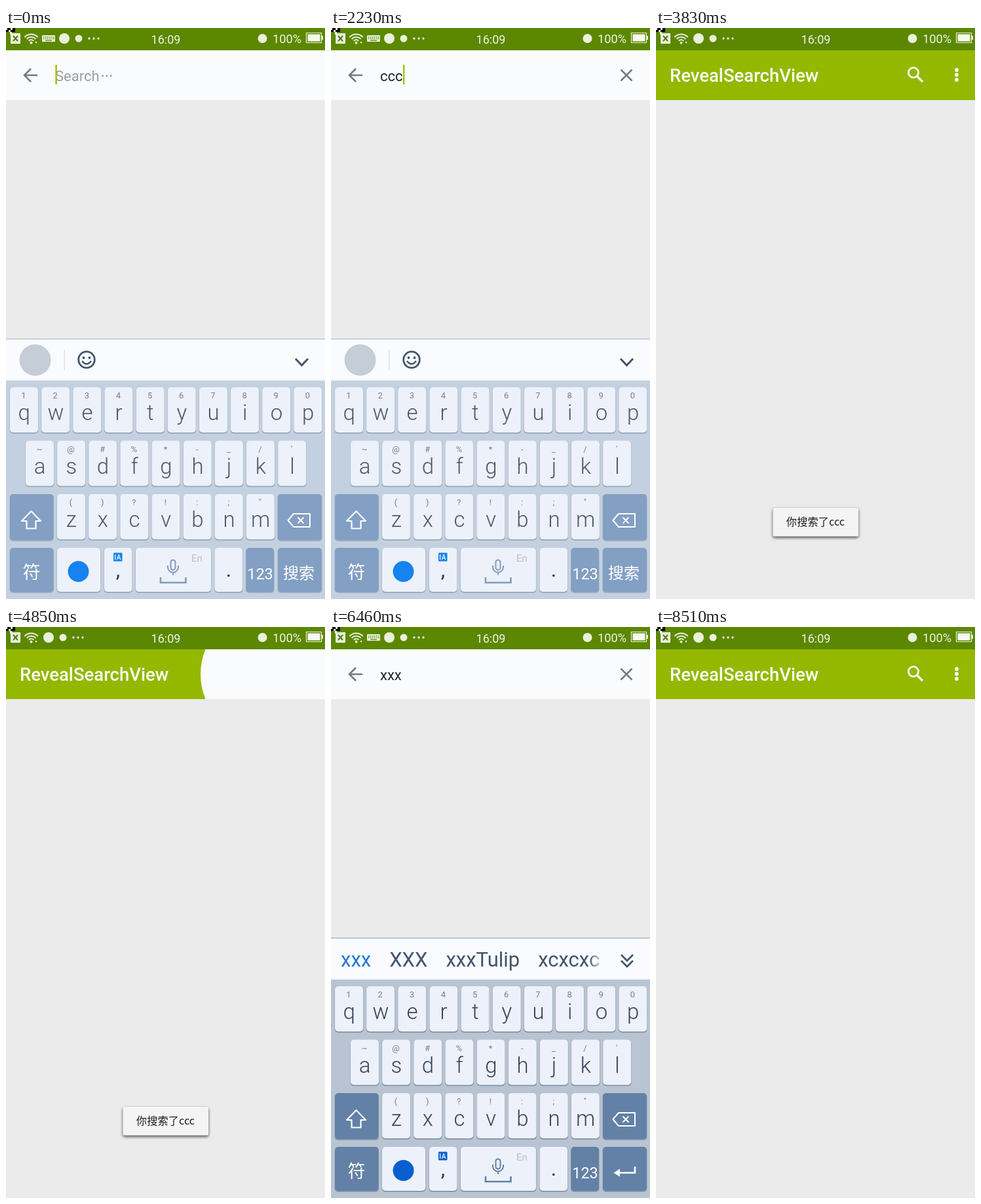
Animation of 487 by 871 pixels, one loop 8.66 s. Source, as an HTML page with a canvas:

```html
<!DOCTYPE html>
<html lang="en">
<head>
<meta charset="utf-8">
<title>Reveal search</title>
<style>
html, body { margin: 0; width: 100%; height: 100%; overflow: hidden; background: #ebebeb; }
canvas { display: block; width: 487px; height: 871px; }
</style>
</head>
<body>
<canvas id="stage" width="487" height="871"></canvas>
<script>
const ctx = document.getElementById('stage').getContext('2d');
const W = 487, H = 871, LOOP = 8660;
const SANS = 'Roboto, sans-serif';
const CJK = '"Noto Sans CJK SC", "Noto Sans CJK", sans-serif';
const WHITE = '#f9fbfd', ICON = '#e9f1da', GREY = '#737985';

const STEPS = [0, 270, 670, 940, 1080, 1220, 1360, 1640, 1790, 2230, 2820,
  3120, 3260, 3400, 3540, 3690, 3830, 4850, 4980, 5120, 5250, 5380, 5520,
  5650, 5780, 5930, 6460, 6600, 6730, 7130, 7530, 7660, 7800, 7930, 8060, 8200];

const TYPING = [[0, ''], [940, 'c'], [1080, 'cc'], [1220, 'ccc'], [4850, ''],
  [5520, 'x'], [5780, 'xx'], [5930, 'xxx'], [7530, '']];
const CURSOR = [[0, true], [270, false], [670, true], [1790, false], [2230, true],
  [2820, false], [4850, true], [6460, false], [6600, true], [7130, false],
  [7530, true], [7800, false]];
const SUGGEST = [[0, false], [940, true], [1640, false], [5520, true], [6600, false]];
const WORDS = {
  c: ['c', 'C', 'can', 'come', 'call'],
  cc: ['cc', 'CC', 'ccc', 'cccc', 'cd'],
  ccc: ['ccc', 'CCC', 'cccc', 'ccccc'],
  x: ['x', 'X', 'xx', 'xxx', 'xcx'],
  xx: ['xx', 'XX', 'xxx', 'xxxx'],
  xxx: ['xxx', 'XXX', 'xxxTulip', 'xcxcxc']
};

const LIGHT_KEYS = { bg: '#c3d0df', key: '#edf1f9', side: '#839fc3', ink: '#4b596b', blue: '#1683f0',
  shade: '#98a8bb', mic: '#819bbd', line: '#a6b4c0' };
const DARK_KEYS = { bg: '#b8c4d2', key: '#edf1f9', side: '#6381a6', ink: '#35455a', blue: '#075fcf',
  shade: '#8593a5', mic: '#6381a6', line: '#8fa4b6' };

const ramp = (t, a, b) => Math.min(1, Math.max(0, (t - a) / (b - a)));
const ease = p => p * p * (3 - 2 * p);
const at = (track, t) => track.filter(k => k[0] <= t).pop()[1];

function text(s, x, y, size, color, align = 'left', weight = 400, family = SANS) {
  ctx.font = `${weight} ${size}px ${family}`;
  ctx.textAlign = align;
  ctx.fillStyle = color;
  ctx.fillText(s, x, y);
  return ctx.measureText(s).width;
}

function rect(x, y, w, h, color, r = 0) {
  ctx.fillStyle = color;
  ctx.beginPath();
  ctx.roundRect(x, y, w, h, r);
  ctx.fill();
}

function dot(x, y, r, color) {
  ctx.fillStyle = color;
  ctx.beginPath();
  ctx.arc(x, y, r, 0, 7);
  ctx.fill();
}

function stroke(d, color, width, cap = 'butt', join = 'miter') {
  ctx.strokeStyle = color;
  ctx.lineWidth = width;
  ctx.lineCap = cap;
  ctx.lineJoin = join;
  ctx.stroke(new Path2D(d));
}

function drawStatus(keyboardUp) {
  rect(0, 0, W, 34, '#5c8700');
  rect(7, 8, 15, 16, ICON, 1);
  stroke('M11 12 l7 8 m0 -8 l-7 8', '#55751a', 2);
  ctx.lineWidth = 2;
  ctx.strokeStyle = ICON;
  for (const r of [5, 9.3, 13.6]) {
    ctx.beginPath();
    ctx.arc(38.5, 23, r, -Math.PI * .77, -Math.PI * .23);
    ctx.stroke();
  }
  dot(38.5, 22.5, 2, ICON);
  dot(46, 22, 1.3, ICON);
  let x = 65;
  if (keyboardUp) {
    rect(55, 11, 20, 10, ICON, 1);
    for (let i = 0; i < 6; i++) {
      rect(57 + i * 3, 13, 1.4, 1.4, '#5c8700');
      rect(57 + i * 3, 15.6, 1.4, 1.4, '#5c8700');
    }
    rect(60, 18.3, 10, 1.3, '#5c8700');
    x = 89;
  }
  dot(x, 16, 8, ICON);
  dot(x + 22, 16, 5.5, ICON);
  for (let i = 0; i < 3; i++) dot(x + 38 + i * 7, 16, 1.7, ICON);
  text('16:09', 244, 24, 18, '#f1f6e4', 'center');
  dot(391.5, 16, 7, ICON);
  text('100%', 407, 22.5, 18.3, '#f1f6e4');
  stroke('M458.5 7.5 h23 v15 h-23 z', ICON, 1.2);
  rect(460.5, 9.5, 19, 11, '#f6f9ed');
  rect(482, 12, 2, 6, ICON);
  rect(0, 0, 14, 6, '#000');
  rect(0, 0, 2, 3, '#eee');
  rect(4, 3, 3, 3, '#eee');
  rect(7, 0, 3, 3, '#eee');
  rect(6, 6, 3, 4, '#eee');
}

function drawToolbar() {
  rect(0, 34, W, 76, '#94b800');
  text('RevealSearchView', 21, 82, 27.5, '#fbfdf5', 'left', 500);
  ctx.strokeStyle = '#fbfdf5';
  ctx.lineWidth = 2.8;
  ctx.beginPath();
  ctx.arc(393, 68, 7.6, 0, 7);
  ctx.stroke();
  stroke('M398 73 L407 82', '#fbfdf5', 3.2);
  for (const y of [64, 71.5, 79]) dot(459, y, 2.9, '#fbfdf5');
}

function drawSearchBar(value, cursor, open) {
  ctx.save();
  ctx.beginPath();
  ctx.rect(0, 34, W, 76);
  ctx.clip();
  ctx.beginPath();
  ctx.arc(396, 72, 402 * open, 0, 7);
  ctx.clip();
  rect(0, 34, W, 76, WHITE);
  stroke('M48 72 H28.5 M38 62 L28 72 L38 82', GREY, 2.6);
  let end = 75;
  if (value) {
    end += text(value, 75, 81, 22, '#23272d');
    stroke('M442.5 63.5 l17 17 m0 -17 l-17 17', GREY, 2.5);
  } else {
    text('Search', 75, 81, 22, '#9b9fa6');
    for (let i = 0; i < 3; i++) dot(147.5 + i * 6.3, 73, 1.4, '#8f939a');
  }
  if (cursor) rect(end + .4, 56, 2.4, 30, '#a2c000');
  ctx.restore();
}

function key(x, y, w, h, fill, c) {
  rect(x - .4, y + .5, w + .8, h + 1.3, c.shade, 5);
  rect(x, y, w, h, fill, 5);
}

function keyRow(letters, hints, x, y, c) {
  [...letters].forEach((letter, i) => {
    const kx = x + i * 48.15;
    key(kx, y, 43, 69, c.key, c);
    text(hints[i], kx + 21, y + 17, 13, '#777e89', 'center');
    text(letter, kx + 21.7, y + 50, 33, c.ink, 'center', 300);
  });
}

function drawStrip(value, suggest, c) {
  rect(0, 474, W, 64, '#f9fbfe');
  rect(0, 474, W, 1, c.line);
  rect(0, 536, W, 2, '#eef2f7');
  const ink = '#43556c';
  if (!suggest) {
    dot(44.5, 506.5, 24, '#c5ced6');
    rect(88.5, 491, 1, 31, '#cbd4dd');
    ctx.strokeStyle = ink;
    ctx.lineWidth = 2.8;
    ctx.beginPath();
    ctx.arc(123, 506, 12.3, 0, 7);
    ctx.stroke();
    dot(118.5, 503, 1.9, ink);
    dot(127.5, 503, 1.9, ink);
    stroke('M116 508 Q123 517 130 508', ink, 2.4);
    stroke('M442 504.5 l9.5 10 l9.5 -10', ink, 3);
    return;
  }
  ctx.save();
  ctx.beginPath();
  ctx.rect(0, 476, 415, 60);
  ctx.clip();
  let x = 15;
  WORDS[value].forEach((word, i) => {
    x += text(word, x, 518, 31, i ? ink : '#2477d4') + 28;
  });
  const fade = ctx.createLinearGradient(392, 0, 420, 0);
  fade.addColorStop(0, 'rgba(249,251,254,0)');
  fade.addColorStop(1, '#f9fbfe');
  ctx.fillStyle = fade;
  ctx.fillRect(392, 477, 28, 58);
  ctx.restore();
  stroke('M443 500 l9 9 l9 -9 M443 509 l9 9 l9 -9', ink, 2.8);
}

function drawKeyboard(value, suggest, up, c) {
  ctx.save();
  ctx.globalAlpha = Math.min(1, up * 1.5);
  ctx.translate(0, (1 - up) * 397);
  rect(0, 538, W, 333, c.bg);
  drawStrip(value, suggest, c);
  keyRow('qwertyuiop', '1234567890', 6, 548, c);
  keyRow('asdfghjkl', '~@#%*-_/\'', 30, 629.5, c);
  keyRow('zxcvbnm', '()?!:;"', 78, 711, c);

  key(6, 711, 66.5, 70, c.side, c);
  stroke('M38.5 737 L53 752 H45.5 V763.5 H31.5 V752 H24 Z', '#fff', 2.2, 'round', 'round');
  key(415, 711, 67, 70, c.side, c);
  stroke('M430.5 751 L439 741 H464 V761 H439 Z', '#fff', 2, 'round', 'round');
  stroke('M445.5 746.5 l9 9 m0 -9 l-9 9', '#fff', 2);

  const y = 793, h = 67;
  key(6, y, 66.5, h, c.side, c);
  text('符', 39, 840, 27, '#fff', 'center', 500, CJK);
  key(78, y, 66, h, c.key, c);
  dot(110.5, 829, 16, c.blue);
  key(150, y, 42.5, h, c.key, c);
  rect(164, 800.5, 13.5, 13, c.blue, 1);
  text('A', 172, 811, 10, '#fff', 'center', 500);
  rect(166, 803, 1.2, 8, '#fff');
  text(',', 171, 837, 32, '#303946', 'center');
  key(198, y, 115, h, c.key, c);
  stroke('M255 815 v8', c.mic, 9, 'round');
  stroke('M255 815 v8', c.key, 5, 'round');
  stroke('M247 820 v2.5 a8 8 0 0 0 16 0 v-2.5 M255 830.5 v4', c.mic, 2);
  stroke('M236 838 v8 h38.5 v-8', c.mic, 2.6);
  text('En', 291.5, 814, 15, '#b4becc', 'center');
  key(318.5, y, 42.5, h, c.key, c);
  text('.', 340, 837, 32, '#303946', 'center');
  key(366.5, y, 42.5, h, c.side, c);
  text('123', 388, 841, 23.5, '#fff', 'center');
  key(415, y, 67, h, c.side, c);
  if (suggest) {
    stroke('M464 823 V832.5 H435', '#fff', 2.6);
    ctx.fillStyle = '#fff';
    ctx.fill(new Path2D('M431.5 832.5 l9.5 -6 v12 z'));
  } else {
    text('搜索', 447, 840, 24, '#fff', 'center', 400, CJK);
  }
  ctx.restore();
}

function drawToast(alpha) {
  ctx.save();
  ctx.globalAlpha = alpha;
  ctx.shadowColor = 'rgba(0,0,0,.7)';
  ctx.shadowBlur = 4;
  ctx.shadowOffsetY = 2;
  rect(178.5, 732, 130.5, 43.5, '#f4f4f4', 2.5);
  ctx.shadowColor = 'transparent';
  text('你搜索了ccc', 243.5, 759, 16.3, '#1c1c1c', 'center', 500, CJK);
  ctx.restore();
}

function draw(t) {
  const value = at(TYPING, t);
  const suggest = at(SUGGEST, t);
  const second = t >= 4850;
  const open = second
    ? ease(ramp(t, 4740, 5080)) - ease(ramp(t, 7800, 8130))
    : 1 - ease(ramp(t, 3120, 3500));
  const up = second
    ? ease(ramp(t, 4850, 5110)) - ease(ramp(t, 7800, 8060))
    : 1 - ease(ramp(t, 3050, 3390));
  const toast = ramp(t, 3260, 3680) - ramp(t, 5120, 5370);

  rect(0, 0, W, H, '#ebebeb');
  drawToolbar();
  if (open > 0) drawSearchBar(value, at(CURSOR, t), open);
  if (up > 0) drawKeyboard(value, suggest, up, second ? DARK_KEYS : LIGHT_KEYS);
  if (toast > 0) drawToast(toast);
  drawStatus(up > 0);
}

const start = performance.now();
function tick() {
  const t = (performance.now() - start) % LOOP;
  draw(STEPS.filter(s => s <= t).pop());
  requestAnimationFrame(tick);
}
tick();
</script>
</body>
</html>
```
